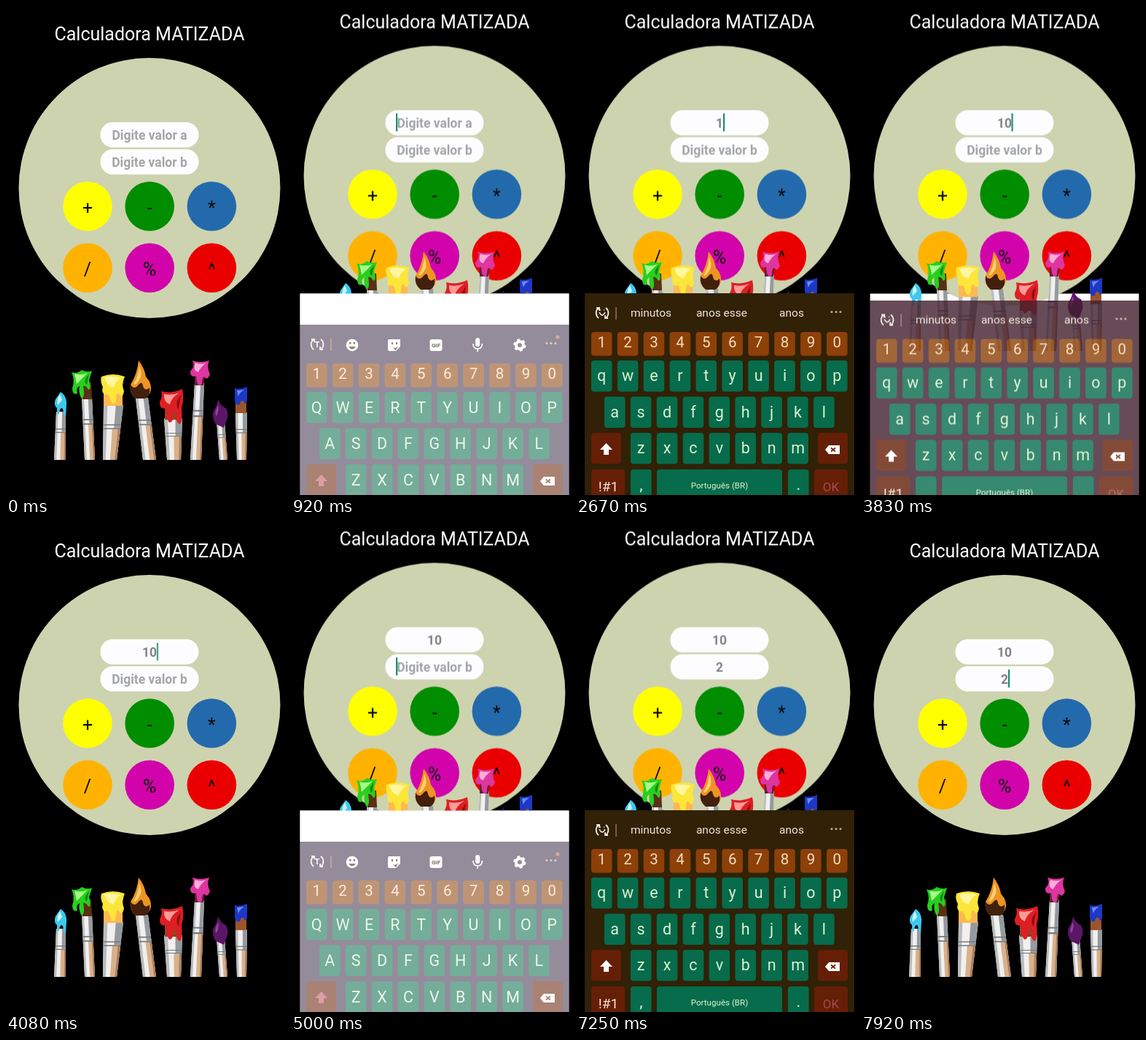
Recreate the animation shown at these times as an HTML page. Size 383 by 669 pixels, loop 8000 ms.

```html
<!DOCTYPE html>
<html lang="pt-BR">
<head>
<meta charset="utf-8">
<title>Calculadora</title>
<style>
html, body { margin: 0; width: 100%; height: 100%; overflow: hidden; background: #000; }
svg { display: block; width: 100vw; height: 100vh; font-family: Roboto, "Noto Sans", sans-serif; }
text { text-anchor: middle; }
.field { fill: #fdfdff; }
.hint, .value { font-size: 17.5px; font-weight: 700; fill: #a3a5a6; }
.value { fill: #838383; }
.sign { font-size: 25px; fill: #0b0b0b; }
.word { font-size: 15.5px; fill: #efe6d6; }

/* everything shares one 8 s clock */
.t { animation: 8s step-end -10ms infinite; }
#page { animation-name: page; }
#brushes { animation-name: brushes; }
#under { animation-name: under; }
#over { animation-name: over; }
#board { animation-name: board; }
#back { animation-name: back; }
#caret { animation-name: caret; }
#upper { animation-name: upper; }
#lower { animation-name: lower; }
#tools { animation-name: tools; }
#words { animation-name: words; }
#hintA { animation-name: hintA; }
#one { animation-name: one; }
#ten { animation-name: ten; }
#hintB { animation-name: hintB; }
#two { animation-name: two; }

@keyframes page {
  0%, 51%, 99%, 100% { transform: none; }
  11.5%, 62.5% { transform: translateY(-16.5px); }
}
@keyframes brushes {
  0%, 51%, 99%, 100% { transform: none; }
  11.5%, 62.5% { transform: translateY(-149px); }
}
@keyframes under { 0%, 51%, 99%, 100% { opacity: 0; } 11.5%, 62.5% { opacity: 1; } }
@keyframes over { 0%, 47.875%, 95.875%, 100% { opacity: 0; } 11.5%, 62.5% { opacity: 1; } }
@keyframes board {
  0%, 51%, 99%, 100% { opacity: 0; transform: translateY(60px); }
  11.5%, 62.5% { opacity: .56; transform: translateY(43px); }
  12.5%, 63.5% { opacity: .8; transform: translateY(20px); }
  13.5%, 64.625% { opacity: .93; transform: translateY(9px); }
  14.625%, 65.625% { opacity: 1; transform: translateY(3px); }
  15.625%, 66.625% { opacity: 1; transform: none; }
  47.875%, 95.875% { opacity: .8; transform: translateY(9.5px); }
  48.875%, 96.875% { opacity: .5; transform: translateY(28px); }
  50%, 97.875% { opacity: .2; transform: translateY(47px); }
}
@keyframes back {
  0%, 47.875%, 95.875%, 100% { fill: #42202f; }
  11.5%, 62.5% { fill: #40324a; }
  13.5%, 64.625% { fill: #302107; }
}
@keyframes caret {
  0%, 13.5%, 26%, 41.625%, 55.25%, 65.625%, 78.125%, 90.625%, 100% { opacity: 0; transform: none; }
  7.25%, 19.75% { opacity: 1; transform: translate(144px, 163.5px); }
  30.25% { opacity: 1; transform: translate(202px, 163.5px); }
  35.375%, 47.875% { opacity: 1; transform: translate(206.5px, 163.5px); }
  58.375%, 71.875% { opacity: 1; transform: translate(144px, 200.5px); }
  83.375%, 95.875% { opacity: 1; transform: translate(202px, 200.5px); }
}
@keyframes upper { 0%, 51%, 100% { opacity: 1; } 30.25%, 83.375% { opacity: 0; } }
@keyframes lower { 0%, 51%, 100% { opacity: 0; } 30.25%, 83.375% { opacity: 1; } }
@keyframes tools { 0%, 51%, 100% { opacity: 1; } 33.375%, 86.5% { opacity: 0; } }
@keyframes words { 0%, 51%, 100% { opacity: 0; } 33.375%, 86.5% { opacity: 1; } }
@keyframes hintA { 0% { opacity: 1; } 30.25%, 100% { opacity: 0; } }
@keyframes one { 0%, 35.375%, 100% { opacity: 0; } 30.25% { opacity: 1; } }
@keyframes ten { 0% { opacity: 0; } 35.375%, 100% { opacity: 1; } }
@keyframes hintB { 0% { opacity: 1; } 83.375%, 100% { opacity: 0; } }
@keyframes two { 0% { opacity: 0; } 83.375%, 100% { opacity: 1; } }
</style>
</head>
<body>
<svg viewBox="0 0 383 669" preserveAspectRatio="none">
  <rect width="383" height="669"/>
  <rect id="under" class="t" x="12.500" y="393.500" width="369" height="276" fill="#fff"/>

  <g id="page" class="t">
    <text x="197" y="46.5" font-size="25" fill="#fff">Calculadora MATIZADA</text>
    <ellipse cx="197" cy="249" rx="179.500" ry="178" fill="#cdd3af"/>
    <rect class="field" x="129.500" y="159" width="135" height="34.500" rx="17"/>
    <rect class="field" x="129.500" y="196" width="135" height="34.500" rx="17"/>
    <text id="hintA" class="t hint" x="197" y="183">Digite valor a</text>
    <text id="one" class="t value" x="197" y="183">1</text>
    <text id="ten" class="t value" x="197" y="183">10</text>
    <text id="hintB" class="t hint" x="197" y="220">Digite valor b</text>
    <text id="two" class="t value" x="197" y="220">2</text>
    <rect id="caret" class="t" width="2.200" height="24.500" fill="#1a9070"/>
    <g id="signs"></g>
  </g>

  <g id="brushes" class="t">
    <g id="handles"></g>
    <!-- cyan -->
    <path fill="#3fc8ef" d="M75 528Q84 534 83 545L82 562Q79 560 78 551Q74 548 73 557Q70 563 70 550Q65 546 68 538Z"/>
    <path fill="#c4f6ff" d="M74 531Q69 539 71 546L77 539Z"/>
    <!-- green -->
    <path fill="#593013" d="M103 515H117L118 538H105Z"/>
    <path fill="#27cf20" d="M90 501Q97 504 104 498Q112 502 118 499L114 512Q118 524 113 525Q110 519 106 520Q109 537 103 536Q99 527 101 520Q96 522 98 530Q91 533 91 523Q95 512 90 501Z"/>
    <path fill="#a8ff86" d="M94 503Q103 506 112 502L103 511L97 517Q96 510 94 503Z"/>
    <path fill="#118a10" d="M114 503L111 518Q107 515 109 510Z"/>
    <!-- yellow -->
    <path fill="#ffb850" d="M134 520H160V547H134Z"/>
    <path fill="#fde63a" d="M131 507Q147 501 163 507Q158 518 162 527Q160 538 155 531Q151 526 151 540Q147 549 143 539Q141 528 137 532Q130 530 133 521Q129 514 131 507Z"/>
    <path fill="#fff6a0" d="M135 508Q146 505 158 509Q150 513 148 522Q138 520 135 508Z"/>
    <!-- orange -->
    <path fill="#ee9422" d="M182 485Q190 495 192 507Q202 518 198 529L192 537H178Q169 530 171 518Q180 504 182 485Z"/>
    <path fill="#42200c" d="M171 518Q176 526 182 518Q187 512 188 520Q191 528 197 522Q199 533 191 537H178Q169 530 171 518Z"/>
    <path fill="#ffcf73" d="M183 492Q188 505 183 511Q178 520 175 517Q182 507 183 492Z"/>
    <!-- red -->
    <path fill="#8e4620" d="M218 545H241V566H218Z"/>
    <path fill="#dc1f24" d="M213 527Q226 531 242 524Q245 536 241 550Q243 571 238 572Q232 569 234 556Q230 553 229 566Q224 575 221 563L219 550Q211 553 211 542Q215 535 213 527Z"/>
    <path fill="#ff9a96" d="M217 531Q229 533 238 529Q227 536 225 545Q216 542 217 531Z"/>
    <path fill="#930d12" d="M240 532L237 552Q233 548 235 540Z"/>
    <!-- pink -->
    <path fill="#642133" d="M259 503H273L271 519H259Z"/>
    <path fill="#de35a0" d="M256 485Q267 489 279 485Q275 493 280 504Q276 513 273 508Q269 505 269 517Q265 523 262 514L261 506Q253 509 253 500Q260 493 256 485Z"/>
    <path fill="#ffabd9" d="M260 488Q268 491 275 488Q267 494 264 501Q256 499 260 488Z"/>
    <!-- purple -->
    <path fill="#5a1766" d="M291 538Q295 548 302 550Q307 560 302 569L299 577L288 572Q282 563 285 554Q290 547 291 538Z"/>
    <path fill="#9740a5" d="M291 546Q293 553 289 561Q285 558 291 546Z"/>
    <!-- blue -->
    <path fill="#9b552c" d="M315 535H330V557H315Z"/>
    <path fill="#1d38c4" d="M314 523Q322 525 331 521L331 541Q328 547 326 540Q322 539 321 545Q315 547 314 539Z"/>
    <path fill="#6c8cff" d="M317 526L327 525Q319 530 319 535Z"/>
  </g>

  <rect id="over" class="t" x="12.500" y="393.500" width="369" height="276" fill="#fff"/>

  <g id="board" class="t">
    <rect id="back" class="t" x="12" y="393" width="370" height="340"/>
    <g fill="none" stroke="#f5eee4" stroke-width="1.800">
      <path d="M31 427A9 9 0 0 1 31 413M41 413A9 9 0 0 1 41 427M28 413H32V417M44 427H40V423"/>
    </g>
    <path d="M55 412V429" stroke="#9c6b62" stroke-width="1.500"/>
    <g fill="#c9a08e"><circle cx="351" cy="418.500" r="1.600"/><circle cx="357" cy="418.500" r="1.600"/><circle cx="363" cy="418.500" r="1.600"/></g>
    <g id="tools" class="t" fill="#fff" transform="translate(0 -1)">
      <text x="36" y="425" font-size="11" font-weight="700">T</text>
      <circle cx="84" cy="422" r="8.300"/>
      <path d="M79 424H89Q84 431 79 424ZM80 418h2.500v2.500h-2.500ZM85.500 418h2.500v2.500h-2.500Z" fill="#302107"/>
      <path d="M135 414H150V424L144 430H135Q133 430 133 428V416Q133 414 135 414Z"/>
      <path d="M138 418h2v3h-2ZM144 418h2v3h-2ZM137 423Q142 429 147 423L144 429Z" fill="#302107"/>
      <rect x="190.500" y="414" width="17" height="16" rx="3"/>
      <text x="199" y="425.200" font-size="8" font-weight="900" fill="#302107">GIF</text>
      <rect x="253.200" y="412" width="6" height="12" rx="3"/>
      <path d="M250 420Q250 427 256.200 427T262.500 420M256.200 427V431" fill="none" stroke="#fff" stroke-width="1.700"/>
      <circle cx="314" cy="422" r="5" fill="none" stroke="#fff" stroke-width="4"/>
      <circle cx="314" cy="422" r="7.400" fill="none" stroke="#fff" stroke-width="2.500" stroke-dasharray="3.900 3.850"/>
      <circle cx="366" cy="411" r="2.500" fill="#c56a3c"/>
    </g>
    <g id="words" class="t">
      <path d="M32 419Q36 427 40 419M33 416h1M38 416h1" fill="none" stroke="#f5eee4" stroke-width="1.600"/>
      <text class="word" x="103" y="424.500">minutos</text>
      <text class="word" x="200" y="424.500">anos esse</text>
      <text class="word" x="296" y="424.500">anos</text>
    </g>
    <g id="keys"></g>
    <g id="upper" class="t"></g>
    <g id="lower" class="t"></g>
    <path d="M342 607L347 601H362V613H347Z" fill="#fff"/>
    <path d="M350 604.500L356 609.500M356 604.500L350 609.500" stroke="#6a2206" stroke-width="1.700"/>
  </g>
</svg>
<script>
const add = (id, html) => document.getElementById(id).insertAdjacentHTML('beforeend', html);

// operator buttons
[['+', '#ffff00'], ['-', '#008d00'], ['*', '#236aad'],
 ['/', '#ffb300'], ['%', '#d203ab'], ['^', '#ea0000']].forEach(([sign, fill], i) => {
  const x = 112 + i % 3 * 85.2, y = 274 + (i > 2) * 84.3;
  add('signs', `<circle cx="${x}" cy="${y}" r="33.8" fill="${fill}"/>
    <text class="sign" x="${x}" y="${y + 10.5}">${sign}</text>`);
});

// brush handles: top left, top right, top y, bottom left, bottom right
const foot = 621;
function handle([a, b, y, c, d]) {
  const at = (u, t) => {
    const left = a + (c - a) * t, right = b + (d - b) * t;
    return `${left + (right - left) * u},${y + (foot - y) * t}`;
  };
  const band = (u, v, s, t, fill) =>
    add('handles', `<polygon points="${at(u, s)} ${at(v, s)} ${at(v, t)} ${at(u, t)}" fill="${fill}"/>`);
  band(0, 1, 0, 1, '#f1f0ee');
  band(0, .2, 0, 1, '#b9bbbd');
  band(.62, 1, 0, .42, '#949a9e');
  band(.52, 1, .42, 1, '#d9b08c');
  band(.86, 1, .42, 1, '#a97d5c');
  band(0, 1, .35, .37, '#777b7e');
  band(0, 1, .42, .44, '#777b7e');
}
[[69, 82, 555, 66, 82], [104, 118, 535, 108, 122], [134, 161, 546, 133, 152],
 [178, 195, 536, 188, 206], [217, 242, 564, 221, 240], [259, 272, 516, 253, 268],
 [289, 300, 567, 293, 304], [315, 331, 556, 317, 330]].forEach(handle);

// keyboard
const pitch = 35.9;
const label = (group, s, x, y, size, fill) =>
  add(group, `<text x="${x}" y="${y}" font-size="${size}" fill="${fill}">${s}</text>`);
const key = (x, y, w, h, fill) =>
  add('keys', `<rect x="${x}" y="${y}" width="${w}" height="${h}" rx="4" fill="${fill}"/>`);
const green = '#066c4b', rust = '#8d4008', dark = '#651f06', pale = '#def2d2';

[...'1234567890'].forEach((n, i) => {
  const x = 35.2 + i * pitch;
  key(x - 14.3, 446, 28.6, 32.5, rust);
  label('keys', n, x, 467, 20.5, '#f4dfbd');
});
[['QWERTYUIOP', 35.2, 485], ['ASDFGHJKL', 53.2, 534.5], ['ZXCVBNM', 89.2, 584]].forEach(([row, x0, y]) =>
  [...row].forEach((c, i) => {
    const x = x0 + i * pitch;
    key(x - 14.3, y, 28.6, 42.5, green);
    label('upper', c, x, y + 28.5, 21.5, pale);
    label('lower', c.toLowerCase(), x, y + 28, 21.5, pale);
  }));
const arrow = fill => `<path d="M41.500 598L50 607H45V614H38V607H33Z" fill="${fill}"/>`;
key(21, 584, 41, 42.5, dark);
key(332, 584, 41, 42.5, dark);
add('upper', arrow('#c2505f'));
add('lower', arrow('#fff'));

[[21, 46, dark], [75, 28.6, green], [111, 172, green], [291, 28.6, green], [327, 46, dark]]
  .forEach(([x, w, fill]) => key(x, 634, w, 42.5, fill));
label('keys', '!#1', 44.5, 664, 19, '#f4e4d2');
label('keys', ',', 89.3, 662, 22, pale);
label('keys', 'Português (BR)', 197, 660, 11.6, pale);
label('keys', '.', 305.3, 662, 22, pale);
label('keys', 'OK', 350, 663.5, 17, '#a44a50');
</script>
</body>
</html>
```
